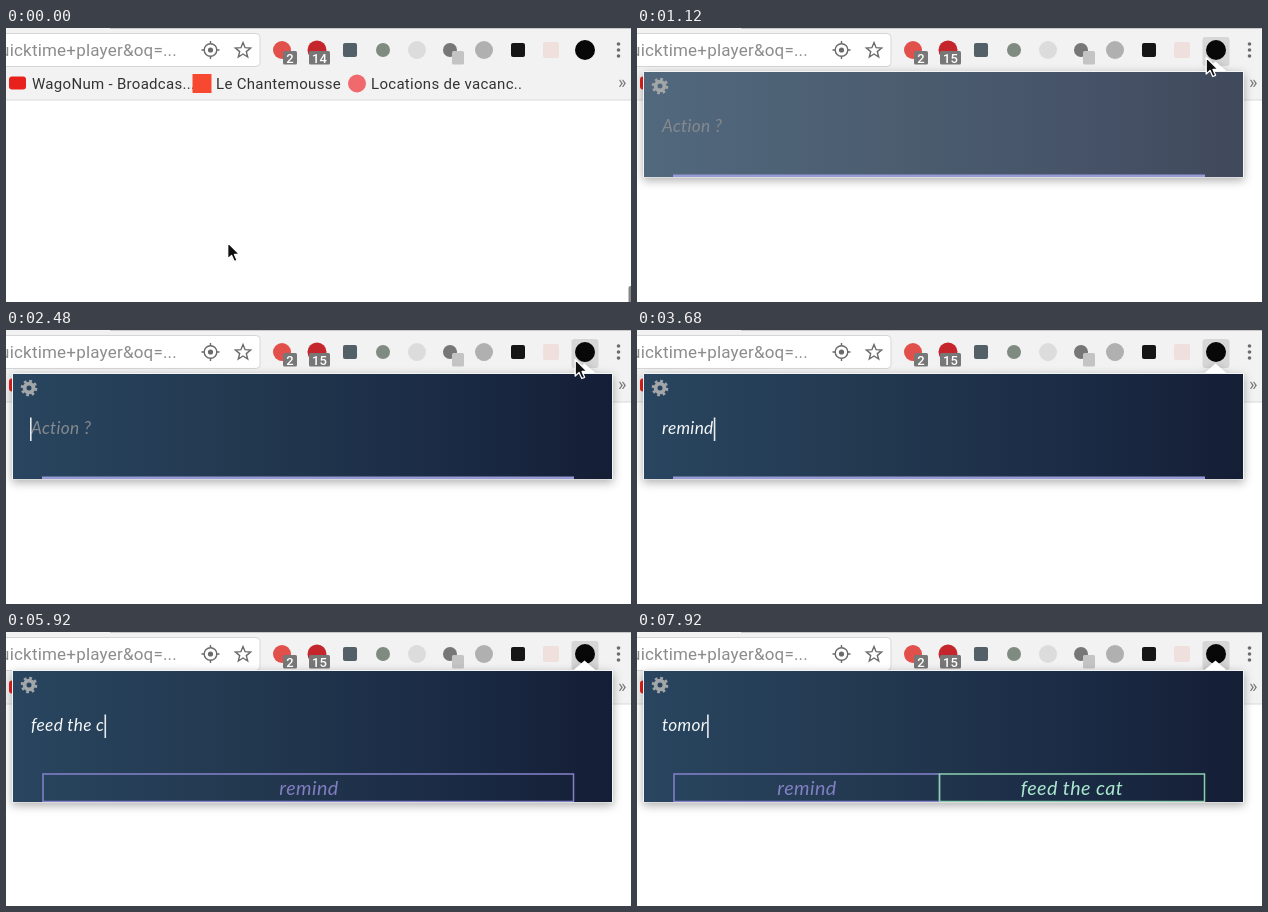
An HTML page that plays this animation: 625x274 px, repeating every 8 s.

```html
<!DOCTYPE html>
<html lang="en">
<head>
<meta charset="utf-8">
<title>Reminder popup</title>
<style>
  html, body { margin: 0; width: 100%; height: 100%; overflow: hidden; background: #fff; }
  svg { display: block; width: 625px; height: 274px; }
  text { white-space: pre; }
  .ui { font-family: Roboto, Inter, sans-serif; }
  .popup-text { font: italic 17.3px Lato, "Open Sans", sans-serif; letter-spacing: .3px; }
  .tag { font: italic 19.7px Lato, "Open Sans", sans-serif; letter-spacing: .45px; text-anchor: middle; }
  #popup { filter: drop-shadow(0 3px 5px rgba(0, 0, 0, .32)); }
</style>
</head>
<body>
<svg viewBox="0 0 625 274">
  <defs>
    <linearGradient id="night">
      <stop offset="0" stop-color="#29455f"/>
      <stop offset=".4" stop-color="#22384f"/>
      <stop offset=".72" stop-color="#1b2b45"/>
      <stop offset="1" stop-color="#141e35"/>
    </linearGradient>
    <clipPath id="panelClip"><rect id="clipBox" x="7" y="0" width="599" height="106"/></clipPath>
  </defs>

  <rect width="625" height="274" fill="#fff"/>
  <rect width="625" height="72" fill="#f2f2f2"/>
  <path d="M104 .5H625" stroke="#c8c8c8"/>
  <path d="M0 72H625" stroke="#d9d9d9"/>
  <rect x="-8" y="5.5" width="262" height="33" rx="4" fill="#fff" stroke="#d6d6d6"/>
  <text class="ui" x="171" y="28" font-size="17" letter-spacing=".2" text-anchor="end" fill="#8c8c8c">quicktime+player&amp;oq=...</text>
  <g fill="none" stroke="#6a6a6a" stroke-width="1.4">
    <circle cx="204.5" cy="22" r="6.3"/>
    <path d="M204.5 13v3M204.5 28v3M195.5 22h3M210.5 22h3"/>
    <circle cx="204.5" cy="22" r="2.6" fill="#6a6a6a" stroke="none"/>
    <path id="star"/>
  </g>
  <rect id="pressed" x="565.5" y="9" width="27" height="29" rx="3" fill="#d7d7d7"/>
  <g id="extensions"></g>
  <g fill="#6c6c6c">
    <circle cx="612.5" cy="16" r="1.8"/><circle cx="612.5" cy="22" r="1.8"/><circle cx="612.5" cy="28" r="1.8"/>
  </g>

  <g class="ui" font-size="15" letter-spacing=".3" fill="#333">
    <rect x="3" y="48.5" width="17" height="13" rx="3" fill="#e8211d"/>
    <text x="26" y="60.5">WagoNum - Broadcas...</text>
    <rect x="186.5" y="46" width="19" height="19" fill="#f6492f"/>
    <text x="210" y="60.5">Le Chantemousse</text>
    <circle cx="351" cy="55.5" r="9" fill="#f0696c"/>
    <text x="365" y="60.5">Locations de vacanc..</text>
    <text x="612" y="60" font-size="18" fill="#777">»</text>
  </g>
  <rect id="scrollbar" x="622.5" y="258" width="6" height="20" rx="2" fill="#858585"/>

  <g id="popup">
    <path d="M567 .5L578.5 -9.5L590 .5Z" fill="#fff"/>
    <rect id="backing" x="6" y="0" width="601" height="106" fill="#f3f4f5"/>
    <rect id="panel" x="7" y="1" width="599" height="105" fill="url(#night)"/>
    <g fill="none" stroke="#a2a6a9">
      <circle cx="23" cy="15" r="4.4" stroke-width="3.8"/>
      <circle cx="23" cy="15" r="7" stroke-width="2.6" stroke-dasharray="2.749 2.749"/>
    </g>
    <text id="entry" class="popup-text" x="25" y="61"></text>
    <rect id="caret" y="44.5" width="1.6" height="23.5" fill="#e8ebee"/>
    <g clip-path="url(#panelClip)">
      <rect id="bar" x="36" y="103.5" width="532" height="3" fill="#979bd6"/>
      <g id="tags" fill="none" stroke-width="1.5">
        <rect id="firstBox" x="37" y="104" height="27.5" stroke="#8582cc"/>
        <rect id="secondBox" x="302.5" y="104" width="265" height="27.5" stroke="#8bcfae"/>
      </g>
      <text id="firstTag" class="tag" y="125" fill="#a598ec">remind</text>
      <text id="secondTag" class="tag" x="435" y="125" fill="#b2f2d5">feed the cat</text>
    </g>
  </g>
  <path id="pointer" d="M0 0V16.5L3.9 13L6.6 19L9.4 17.8L6.8 12H12Z" fill="#111" stroke="#fff" stroke-width="1.3" stroke-linejoin="round"/>
</svg>

<script>
const LOOP = 8000, STEP = 80;
const byId = id => document.getElementById(id);
const setAttrs = (id, attrs) => {
  for (const key in attrs) byId(id).setAttribute(key, attrs[key]);
};
const show = (id, visible) => { byId(id).style.display = visible ? "" : "none"; };
const progress = (t, from, to) => Math.min(1, Math.max(0, (t - from) / (to - from)));
const ease = p => p * p * (3 - 2 * p);

const starPoints = Array.from({ length: 10 }, (_, i) => {
  const angle = i * Math.PI / 5 - Math.PI / 2, r = i % 2 ? 3.5 : 8;
  return (237 + r * Math.cos(angle)).toFixed(1) + " " + (22.5 + r * Math.sin(angle)).toFixed(1);
});
setAttrs("star", { d: "M" + starPoints.join("L") + "Z" });

const disc = (x, r, color) => `<circle cx="${x}" cy="22" r="${r}" fill="${color}"/>`;
const square = (x, size, color) =>
  `<rect x="${x - size / 2}" y="${22 - size / 2}" width="${size}" height="${size}" rx="2" fill="${color}"/>`;
const badge = (x, width, label, id, color = "#777") =>
  `<rect x="${x}" y="23" width="${width}" height="13.5" rx="1.5" fill="${color}"/>
   <text id="${id}" class="ui" x="${x + width / 2}" y="34.5" font-size="13" font-weight="500"
     text-anchor="middle" fill="#fff">${label}</text>`;

byId("extensions").innerHTML = [
  disc(276, 9, "#e2504c"), badge(277, 14, "2", "smallCount"),
  disc(311, 9.5, "#c4262b"), badge(303, 21, "14", "blockCount"),
  square(344, 14, "#536068"),
  disc(377, 7, "#7f8b80"),
  disc(411, 9, "#dcdcdc"),
  disc(444, 7, "#777"), badge(446, 12, "", "emptyCount", "#c4c4c4"),
  disc(478, 9, "#b0b0b0"),
  square(512, 14, "#151515"),
  square(545, 16, "#efe0de"),
  disc(579, 10, "#080808")
].join("");

// Each prompt has a start time, a placeholder and the times of its key presses.
const prompts = [
  { start: 0, hint: "Action ?", text: "remind", keys: [2800, 2960, 3120, 3200, 3360, 3520] },
  { start: 4000, hint: "What ?", text: "feed the cat",
    keys: [4560, 4800, 4960, 5120, 5280, 5440, 5520, 5680, 5840, 5920, 6000, 6160] },
  { start: 6400, hint: "When ?", text: "tomor", keys: [7200, 7360, 7520, 7680, 7840] }
];

function drawEntry(t) {
  const prompt = prompts.filter(p => t >= p.start).pop();
  const typed = prompt.text.slice(0, prompt.keys.filter(key => t >= key).length);
  const entry = byId("entry");
  const label = typed || prompt.hint;
  if (entry.textContent !== label) entry.textContent = label;
  setAttrs("entry", { fill: typed ? "#f4f6f8" : "#858a8f" });
  setAttrs("caret", { x: typed ? 25.2 + entry.getComputedTextLength() : 24 });
  const blinkOff = t < 1440 || (t >= 1920 && t < 2400) || (t >= 6960 && t < 7200);
  show("caret", !blinkOff);
}

function drawPopup(t) {
  const grow = ease(progress(t, 3920, 4240));
  const height = 106 + 26 * grow;
  const split = t >= 6400;
  show("popup", t >= 1120);
  setAttrs("popup", { transform: `translate(0 ${43 - 5 * grow})` });
  setAttrs("backing", { height: height + 0.5 });
  setAttrs("panel", { height: height - 1, opacity: t < 1200 ? 0.8 : 1 });
  setAttrs("clipBox", { height });
  show("bar", !grow);
  show("tags", grow);
  setAttrs("firstBox", { width: split ? 265.5 : 530.5 });
  show("secondBox", split);
  show("secondTag", split);

  // The two labels pulse in opposite phase.
  const wave = Math.cos((t - 6850) / 1000 * Math.PI);
  const fadeIn = progress(t, 4000, 4400);
  setAttrs("firstTag", { x: split ? 170 : 303, opacity: fadeIn * (0.85 + 0.12 * wave) });
  setAttrs("secondTag", { opacity: 0.72 - 0.24 * wave });
}

function draw(t) {
  const move = ease(progress(t, 0, 880));
  setAttrs("pointer", { transform: `translate(${221.7 + 347.5 * move} ${214.5 - 185 * move})` });
  show("pointer", t < 2800);
  show("pressed", t >= 880);
  show("scrollbar", t < 400);
  byId("blockCount").textContent = t < 480 ? "14" : "15";
  drawPopup(t);
  drawEntry(t);
}

function tick() {
  const t = performance.now() % LOOP;
  draw(Math.floor(t / STEP) * STEP);
  requestAnimationFrame(tick);
}
tick();
</script>
</body>
</html>
```
